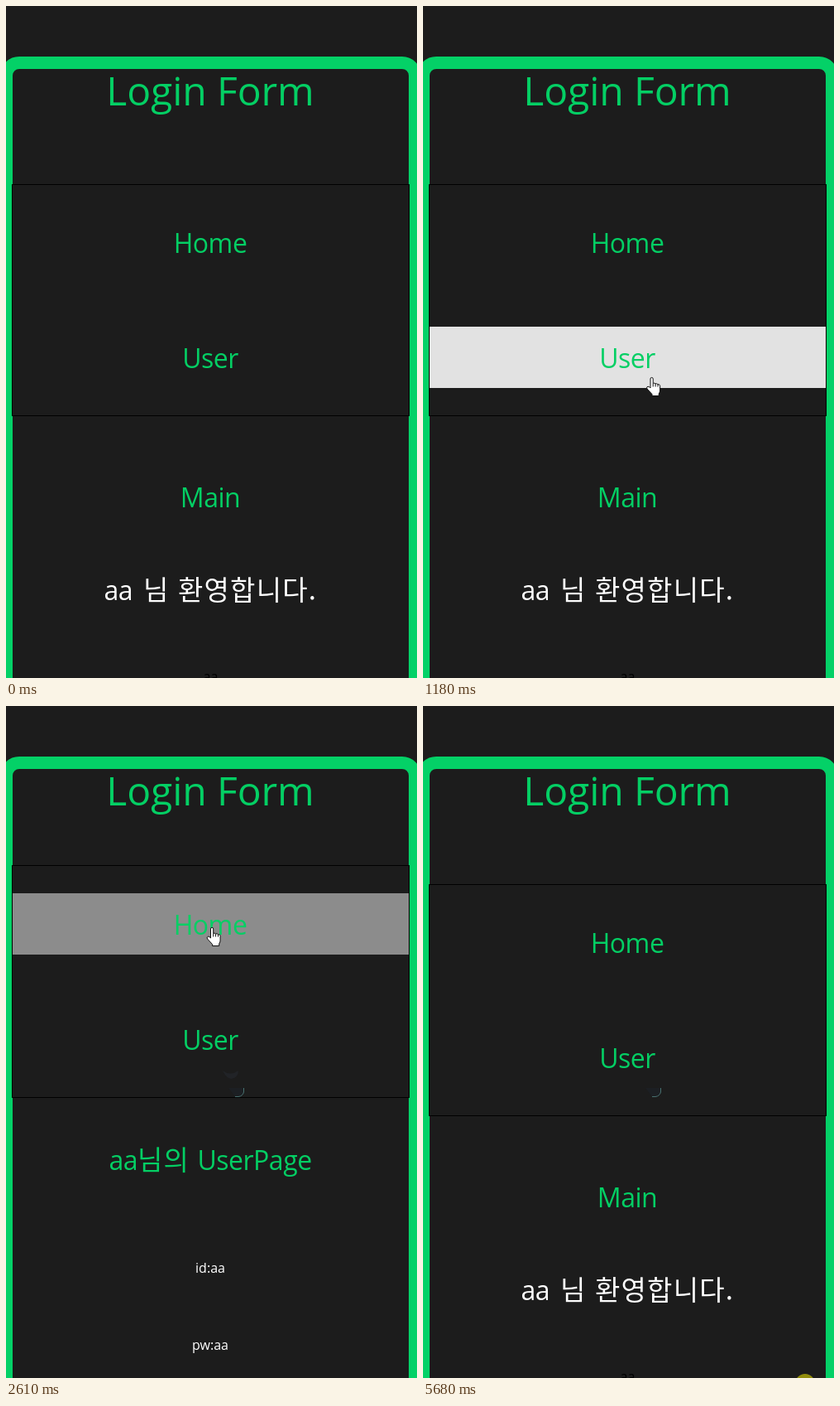
These frames come from a looping animation (497 by 811 pixels, 5.75 s). An HTML page:

```html
<!DOCTYPE html>
<html lang="ko">
<head>
<meta charset="utf-8">
<title>Login Form</title>
<style>
  html, body { margin: 0; width: 100%; height: 100%; overflow: hidden; background: #1c1c1c; }
  svg { display: block; }
  text { font: 32px "Open Sans", "Noto Sans", "Noto Sans CJK KR", sans-serif; letter-spacing: -.5px; fill: #04cf64; }
  .mid { text-anchor: middle; }
  .title { font-size: 48px; letter-spacing: -.1px; }
  .small { font-size: 16px; letter-spacing: 0; }
  .white { fill: #fff; }
  .ko { font-family: "Noto Sans CJK KR", "Noto Sans CJK", sans-serif; font-size: 33px; letter-spacing: 1.2px; }
  .row { fill: #f5f5f5; }
  .pointer { fill: #fff; stroke: #111; stroke-linejoin: round; }
</style>
</head>
<body>
<svg width="497" height="811" viewBox="0 0 497 811">
  <rect width="497" height="811" fill="#1c1c1c"/>
  <rect x=".5" y="68.5" width="494" height="900" rx="15.5" fill="none" stroke="#04d167" stroke-width="15"/>
  <text class="mid title" x="247" y="120">Login Form</text>

  <rect id="box" x="7.5" width="480" fill="none" stroke="#000"/>
  <g id="menu">
    <rect id="homeRow" class="row" x="8" y="248" width="479" height="74"/>
    <rect id="userRow" class="row" x="8" y="387" width="479" height="74"/>
    <text class="mid" x="247" y="298">Home</text>
    <text class="mid" x="247" y="437">User</text>
  </g>

  <g id="mainPage">
    <text class="mid" x="247" y="605">Main</text>
    <text class="white" y="717"><tspan x="118.5">aa</tspan><tspan class="ko" x="166">님</tspan><tspan class="ko" x="208">환영합니다.</tspan></text>
    <text class="mid small" x="247.5" y="815" style="fill:#000">aa</text>
  </g>
  <g id="userPage">
    <text y="560"><tspan x="124.5">aa</tspan><tspan class="ko" x="159">님의</tspan><tspan x="231.5">UserPage</tspan></text>
    <text class="mid small white" x="247" y="684">id:aa</text>
    <text class="mid small white" x="247" y="777">pw:aa</text>
  </g>

  <g id="trailA">
    <path d="M269 461H288V466Q286 471 281 471.5H277Z" fill="#1c1f23"/>
    <path d="M287.5 461V466Q286 471 281 471.5H277" fill="none" stroke="#48706f"/>
  </g>
  <path id="trailB" d="M262 440Q271 447 281 440Q281 449 272 450Q266 449 262 440Z" fill="#212327"/>

  <circle id="ring" r="12" fill="#fff500" fill-opacity=".52"/>
  <g id="hand" class="pointer">
    <path d="M5 13V2a1.6 1.6 0 0 1 3.2 0V7.5q1.4-1 2.9.4q1.5-.8 2.9.8q2-.6 2.6 1.6V16q0 2-1.4 4V22.5H7V20.5L1 14Q-.3 11.6 2 11.2Q3.4 11 5 13Z"/>
    <path d="M8.2 7.5V11.5M11.1 8V11.5M14 8.7V11.5" fill="none"/>
  </g>
  <path id="arrow" class="pointer" d="M0 0V16L3.7 12.6L6.2 18.3L8.6 17.2L6.2 11.7H11.3Z"/>
</svg>
<script>
const LOOP = 5750, TICKS = 84, TICK = LOOP / TICKS;
const FADE = 1000 / TICK;

// pointer tip: tick, x, y
const PATH = [
  [1, 440, 783], [3, 396, 694], [5, 336, 568], [7, 288, 471], [8, 279, 453], [9, 276.5, 448],
  [18, 276.5, 448], [20, 268, 420], [21, 268, 420], [22, 268, 427], [24, 268, 427],
  [25, 268, 420], [28, 226.5, 421], [31, 226.5, 421], [33, 232, 350], [34, 240, 298],
  [36, 249, 267], [53, 249, 267], [54, 262, 300], [56, 400, 664]
];
// press marks: first tick, last tick, x, y
const PRESSES = [[20, 21, 268, 420], [46, 47, 248, 268], [83, 83, 462, 818]];
// row hover: start tick, end tick
const HOVER = { userRow: [7.45, 33], homeRow: [33.6, 55] };
const USER_PAGE = [22, 48];

const $ = id => document.getElementById(id);
const within = (n, [a, b]) => n >= a && n < b;
const show = (id, on) => $(id).setAttribute("visibility", on ? "visible" : "hidden");
const move = (id, x, y) => $(id).setAttribute("transform", `translate(${x} ${y})`);

// cubic-bezier(.25, .1, .25, 1)
function ease(p) {
  if (p <= 0) return 0;
  if (p >= 1) return 1;
  const curve = (u, a, b) => 3 * u * (1 - u) ** 2 * a + 3 * u * u * (1 - u) * b + u ** 3;
  let lo = 0, hi = 1;
  for (let i = 0; i < 20; i++) {
    const mid = (lo + hi) / 2;
    if (curve(mid, .25, .25) < p) lo = mid; else hi = mid;
  }
  return curve(lo, .1, 1);
}

function tipAt(n) {
  const i = PATH.findIndex(k => k[0] >= n);
  if (i < 0 || n < PATH[0][0]) return null;
  const b = PATH[i], a = PATH[Math.max(i - 1, 0)];
  const p = b === a ? 0 : (n - a[0]) / (b[0] - a[0]);
  return [a[1] + (b[1] - a[1]) * p, a[2] + (b[2] - a[2]) * p];
}

function draw(n) {
  const user = within(n, USER_PAGE);
  show("userPage", user);
  show("mainPage", !user);
  move("menu", 0, user ? -22 : 0);
  $("box").setAttribute("y", user ? 192.5 : 215.5);
  $("box").setAttribute("height", user ? 280 : 279);

  let hovering = false;
  for (const [id, span] of Object.entries(HOVER)) {
    const on = within(n, span);
    hovering = hovering || on;
    $(id).setAttribute("opacity", on ? ease((n - span[0]) / FADE) : 0);
  }

  show("trailA", n >= 19);
  show("trailB", within(n, [25, 48]));

  const press = PRESSES.find(([a, b]) => n >= a && n <= b);
  show("ring", press);
  if (press) move("ring", press[2], press[3]);

  const tip = tipAt(n);
  show("hand", tip && hovering);
  show("arrow", tip && !hovering);
  if (tip) {
    move("hand", tip[0] - 6.5, tip[1]);
    move("arrow", tip[0], tip[1]);
  }
}

const start = performance.now();
function frame() {
  const t = (performance.now() - start) % LOOP;
  draw(Math.floor((t + 12) / TICK) % TICKS);
  requestAnimationFrame(frame);
}
frame();
</script>
</body>
</html>
```
